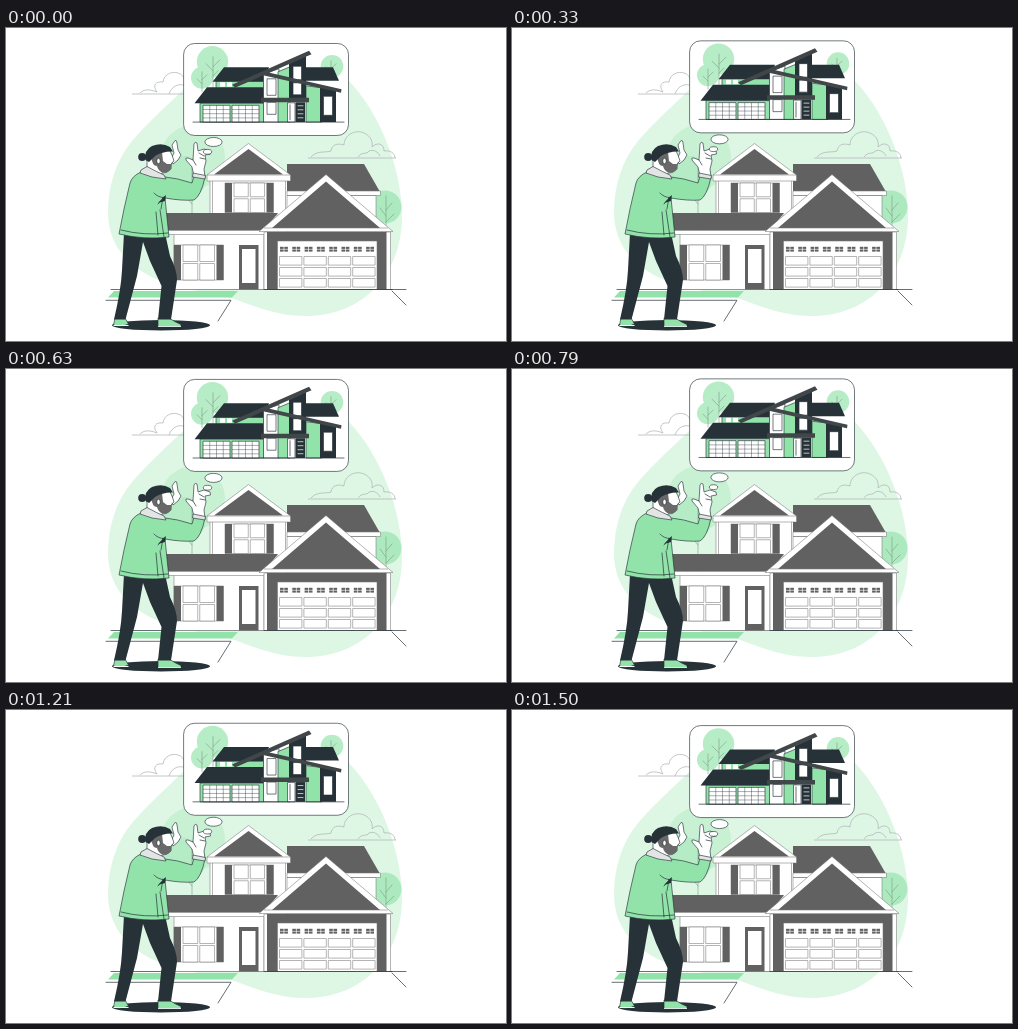
An HTML page for the animation above (1540 ms loop, 500 by 313 pixels).

```html
<!DOCTYPE html>
<html lang="en">
<head>
<meta charset="utf-8">
<title>House plans</title>
<style>
html, body { margin: 0; width: 100%; height: 100%; overflow: hidden; background: #fff; }
svg { display: block; width: 100%; height: 100%; }
.d { fill: #263238; } .g { fill: #92e3a9; } .h { fill: #616161; } .w { fill: #fff; }
.l { fill: none; stroke: #263238; stroke-width: .7; stroke-linejoin: round; stroke-linecap: round; }
.o { stroke: #263238; stroke-width: .65; stroke-linejoin: round; }
.t { fill: none; stroke: #7d9a87; stroke-width: .6; stroke-linecap: round; }
.c { fill: none; stroke: #b0b3b4; stroke-width: .75; stroke-linejoin: round; }
.e { stroke: #777; stroke-width: .55; stroke-linejoin: round; }
.s { fill: none; stroke: #263238; stroke-width: .4; }
</style>
</head>
<body>
<svg viewBox="0 0 500 313" xmlns="http://www.w3.org/2000/svg">
  <path fill="#def7e5" d="M102 184C102 158 110 132 126 113C142 94 163 76 178 61C205 36 240 30 275 30C305 30 328 38 343 53C374 85 397 143 396 190C395 249 355 288 300 288C258 288 232 268 200 264C150 258 102 235 102 184Z"/>

  <g id="clouds">
    <path class="c" d="M126 66H181M134 65C139 60 146 62 151 64C146 57 150 53 157 54C158 46 166 43 172 45C176 46 178 49 179 53M163 66C166 57 174 55 180 58"/>
    <path class="c" d="M302 130H390M305 129C311 122 320 125 325 123C326 116 332 115 338 117C338 107 349 101 358 105C365 108 367 114 366 119C371 114 378 115 378 123C384 122 389 125 389 130M352 129C356 123 361 127 363 123C368 121 372 124 374 128"/>
  </g>

  <g id="trees">
    <circle cx="187" cy="129" r="32" fill="#c8f1d4"/>
    <circle cx="178" cy="150" r="22" fill="#b5ebc5"/>
    <path class="t" d="M186 205V140M186 165L196 153M186 176L177 165"/>
    <circle cx="379" cy="179" r="16.5" fill="#ade9bf"/>
    <path class="t" d="M380 203V168M380 182L386 175M380 188L374 180M380 194L388 186"/>
  </g>

  <g id="ground">
    <path class="g" d="M108 263H232L226 269.5H102Z"/>
    <path class="l" d="M105 261.5H400M100 272.3H225L212 293M386 263L400 277"/>
  </g>

  <g id="house">
    <path class="w e" d="M204 151H283V187H204Z"/>
    <path class="h" d="M281 136H358L373.500 163H281Z"/>
    <path class="w e" d="M281 163H374.5V167.5H281ZM281 167.5H370V204H281Z"/>
    <path class="w e" d="M242.5 115.5L284.5 147V153H201V147Z"/>
    <path class="h" d="M242.5 121L277 146.5H208Z"/>
    <path class="e" fill="none" d="M201 147H284.5M206.5 153V185M279.5 153V185"/>
    <g id="topWin"></g>
    <path class="w e" d="M168 204H262V261.5H168Z"/>
    <path class="h" d="M160 185H272L258 202.500H160Z"/>
    <path class="w e" d="M160 202.500H260V206.5H160Z"/>
    <g id="lowWin"></g>
    <path class="h" d="M233 217H252.5V261.5H233Z"/>
    <path class="w" d="M236 221H249.5V255H236Z"/>
    <path class="e" fill="none" d="M258 207V261"/>
    <path class="w e" d="M258 204H384.500V261.5H258Z"/>
    <path class="h" d="M261 204H380.500V261.5H261Z"/>
    <path class="w e" d="M320 146.5L387 203.5H253Z"/>
    <path class="h" d="M320 153.5L374 200H266Z"/>
    <path class="e" fill="none" d="M258 200H382"/>
    <path class="w e" d="M271.5 213H371V261.5H271.5Z"/>
    <g id="garage"></g>
    <path class="l" d="M258 261.5H386"/>
  </g>

  <g id="man">
    <ellipse class="d" cx="155" cy="297.200" rx="49" ry="5.200"/>
    <path class="g o" d="M109 290H119L122.500 296Q114 300 107.5 297ZM152 290H163Q169 294 175 296.5V299H152Z"/>
    <path class="w" d="M107.5 297H122.500V298H107.5ZM152 298.200H175V299H152Z"/>
    <path class="d" d="M118 205H159L164 228Q171 242 171 252L165 291.500H152L155.500 258L144 233L137 214L131 248L119.500 291.500H108Q115 262 116 242Z"/>
    <path class="w o" d="M165 131L168 125L166 117L169 112.500Q171 112 171 115L172 122L175 127L172 132L167 136Z"/>
    <path class="w o" d="M140 128Q141 121 149 119L163 121L166 127L168 133L165.500 135L165 141Q160 146 156 145L153 150L138 146Q143 140 140 128Z"/>
    <path fill="#696969" d="M145 128L156 124L157 133L161 136L165 136L165 141Q161 146 156 144.500Q152 142 151 138Q146 138 145 128Z"/>
    <ellipse class="w o" cx="152.500" cy="133" rx="1.800" ry="2.800"/>
    <path class="d" d="M139.500 132Q138 122 146 118Q156 114 164 119L167 123.500Q157 123 149 128L143 134Z"/>
    <circle class="d" cx="136.200" cy="129" r="4"/>
    <path class="w o" d="M188 148L186 139L180 132Q179 129 182 130L187 132L188 116Q189 113 191 115L192 123L198 121L204 123L204.500 126L199 127L200 133L198 141L199 149Z"/>
    <path class="l" d="M187 132L190 137M193 125L198 128M194 130L199 131"/>
    <path class="g o" d="M135 144Q126 148 124 155L118 181L113 206Q138 212 163 209L159 170Q176 173 188 172Q195 168 199 149L188 148L186 155Q171 150 159 149Q146 145 135 144Z"/>
    <path class="o" fill="#e3e5e4" d="M135 142L141 138.500Q151 144 158 147L160 151Q145 150 134 145Z"/>
    <path class="o" fill="#e3e5e4" d="M187 145L199.500 147.500L199 151L186.500 149Z"/>
    <path class="l" d="M159 170Q151 169 148 165M159 168L152 176M157 169L155 181M150 184L152 207M154 182L158 209M115 202Q138 208 162 205"/>
    <path class="d" d="M152 175L160 167L159 173Z"/>
  </g>

  <g id="idea">
    <ellipse class="w o" cx="207.500" cy="114.200" rx="8.600" ry="4.500"/>
    <ellipse class="w o" cx="201.500" cy="124" rx="4.200" ry="2.400"/>
    <rect class="w o" x="177.600" y="15.700" width="164.900" height="92" rx="11"/>
    <g fill="#b7edc6">
      <circle cx="206.500" cy="34" r="15.700"/><circle cx="196" cy="50" r="11"/><circle cx="326" cy="38.500" r="11.300"/>
    </g>
    <path class="t" d="M207 60V29M207 39L214 32M207 43L200 36M207 48L212 43M196 64V44M196 52L201 47M196 56L191 51M325 52V33M325 41L330 36M325 45L320 39"/>
    <path class="g o" d="M210 53H258V61H210Z"/>
    <path class="w" d="M214 54.500H219V59H214ZM221 54.500H226V59H221Z"/>
    <path class="d" d="M218 39.500H263L258 54H206.500Z"/>
    <path class="d" d="M201 59.500H258V75.500H188.500Z"/>
    <path class="g o" d="M194 75.500H258V94.300H194Z"/>
    <g id="bays"></g>
    <path class="d" d="M297 39.500H327L333 53H297Z"/>
    <path class="w o" d="M257.500 46L273 41V94.300H257.500Z"/>
    <path class="g o" d="M272 44L284 39V94.300H272ZM300 58L316 60V94.300H300Z"/>
    <path class="d" d="M283 36L300 28V74H283ZM314 58L330 62V94.300H314Z"/>
    <path class="w o" d="M287 38.500H295.500V52H287ZM287 55H295.500V67H287ZM261 51H270V67.500H261ZM261 74.500H270V86.500H261ZM317.500 68.500H326.500V87.500H317.500Z"/>
    <path fill="#414649" d="M226 57L303 23L305.500 26.500L229 60ZM257 43.500L335.500 61.500L335 65L257 47.500ZM255 70H303V74.500H255Z"/>
    <path class="w o" d="M281.500 75H289V94.300H281.500Z"/>
    <path class="d" d="M289.500 74.500H299V94.300H289.500Z"/>
    <path class="l" style="stroke:#fff" d="M292 78H297M292 82H297M292 86H297M292 90H297"/>
    <path class="l" d="M284 77V92M187 94.300H338"/>
  </g>
</svg>
<script>
const $ = id => document.getElementById(id);
const box = (x, y, w, h, cls) => `<rect x="${x}" y="${y}" width="${w}" height="${h}" class="${cls}"/>`;

// Four white panes between dark shutters
function sash(x, y, w, h) {
  const side = 7, pw = (w - 2 * side - 6) / 2, ph = (h - 2) / 2;
  let out = box(x, y, w, h, "w e") + box(x, y, side, h, "h") + box(x + w - side, y, side, h, "h");
  for (let i = 0; i < 4; i++)
    out += box(x + side + 2 + (i % 2) * (pw + 2), y + (i >> 1) * (ph + 2), pw, ph, "w e");
  return out;
}

function garage() {
  let out = "";
  for (let c = 0; c < 8; c++)
    for (let i = 0; i < 4; i++)
      out += box(274 + c * 12.3 + (i % 2) * 4.3, 218.8 + (i >> 1) * 2.7, 3.6, 2.1, "h");
  for (let r = 0; r < 3; r++)
    for (let c = 0; c < 4; c++) out += box(273.5 + c * 24.4, 228.5 + r * 11, 22.4, 8.6, "w e");
  return out;
}

function bays() {
  let out = "";
  for (const x of [197, 226]) {
    out += box(x, 77.5, 27, 16.8, "w o");
    for (let i = 1; i < 4; i++)
      out += `<path class="s" d="M${x} ${77.5 + i * 4.2}h27M${x + i * 6.75} 77.5v16.8"/>`;
  }
  return out;
}

$("topWin").innerHTML = sash(219, 155, 48.5, 29.5);
$("lowWin").innerHTML = sash(168, 217, 49.5, 35);
$("garage").innerHTML = garage();
$("bays").innerHTML = bays();

const LOOP = 1540, LIFT = 6.2, LEAD = 25;
const idea = $("idea");

function draw(t) {
  const p = ((t + LEAD) % LOOP) / LOOP;
  const rise = LIFT * (1 - Math.abs(1 - 2 * p));
  idea.setAttribute("transform", `translate(0 ${-rise.toFixed(3)})`);
}

const start = performance.now();
function tick() {
  draw(performance.now() - start);
  requestAnimationFrame(tick);
}
draw(0);
requestAnimationFrame(tick);
</script>
</body>
</html>
```
